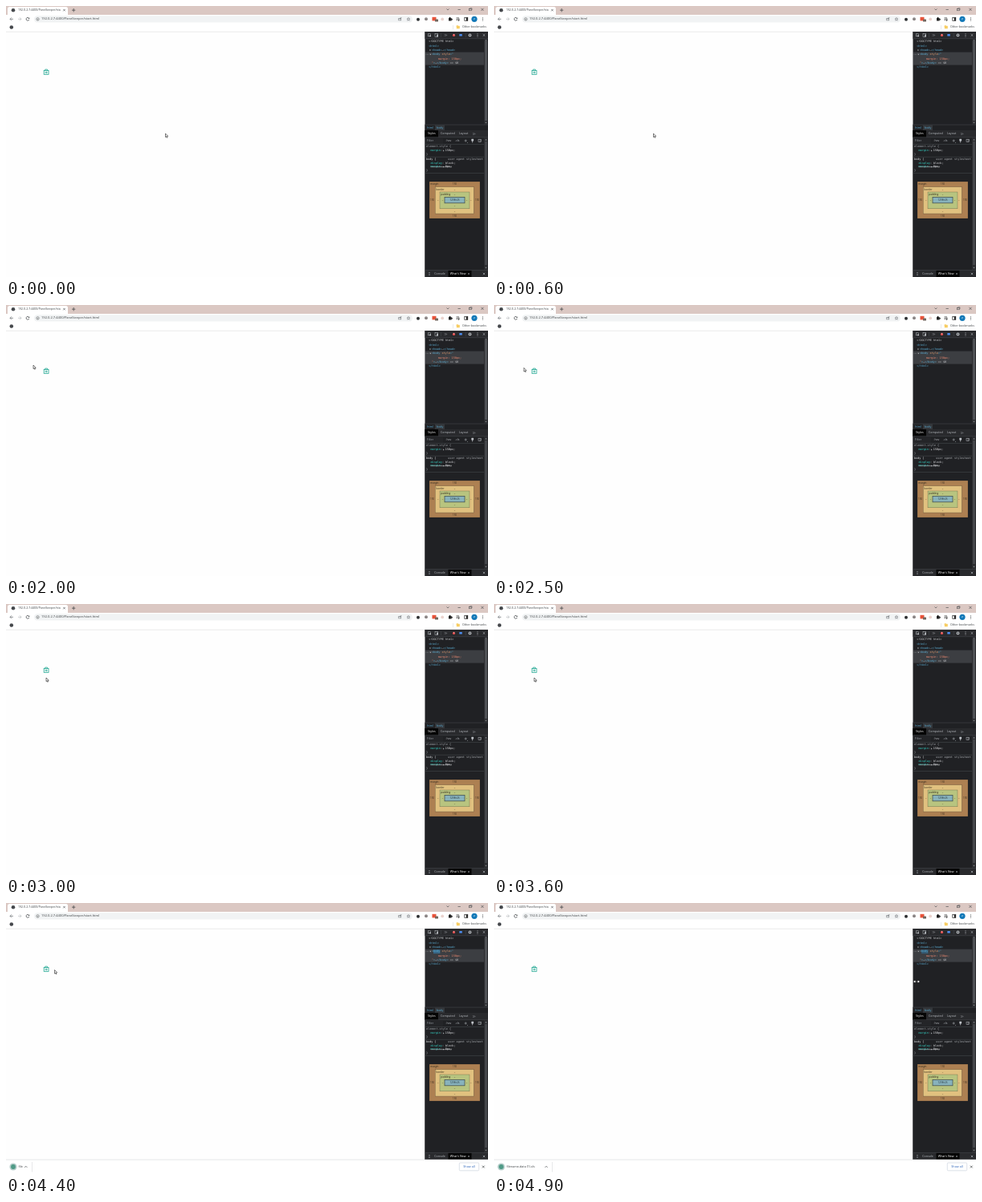
These frames come from a looping animation (600x338 px, 5 s). An HTML page with a canvas:

```html
<!DOCTYPE html>
<html lang="en">
<head>
<meta charset="utf-8">
<title>Browser session</title>
<style>
html, body { margin: 0; width: 100%; height: 100%; overflow: hidden; background: #fff; }
canvas { display: block; width: 100vw; height: 100vh; }
</style>
</head>
<body>
<canvas id="stage"></canvas>
<script>
const W = 600, H = 338, LOOP = 5000, STEP = 100;
const canvas = document.getElementById('stage');
const c = canvas.getContext('2d');
const SANS = '"Open Sans", "Noto Sans", sans-serif';
const MONO = '"DejaVu Sans Mono", "Noto Sans Mono", monospace';
const ADDRESS = '192.0.2.7:4400/Panelkeeper/start.html';
const INK = '#3c4043', PANEL = '#202124', BAR = '#292a2d', RULE = '#494c50';
const TAG = '#5db0d7', PROP = '#35d4c7', VALUE = '#e8eaed', PALE = '#bdc1c6';

// Cursor path: time, x, y of the tip
const PATH = [[0, 198.5, 159], [1300, 198.5, 159], [2000, 34, 75], [2300, 34, 75],
  [3000, 50, 92], [3600, 50, 92], [3900, 50.5, 82.5], [4200, 50.5, 82.5],
  [4400, 60.5, 83.5], [4500, 62, 84], [4900, 526, 98]];
const BAR_AT = 4300, FLASH_AT = 4100;

const clamp = v => Math.max(0, Math.min(1, v));
const mix = (a, b, k) => a + (b - a) * k;
const ease = k => k * k * (3 - 2 * k);

function rect(x, y, w, h, color) {
  c.fillStyle = color;
  c.fillRect(x, y, w, h);
}

function round(x, y, w, h, r, color, stroke) {
  c.beginPath();
  c.roundRect(x, y, w, h, r);
  if (color) { c.fillStyle = color; c.fill(); }
  if (stroke) { c.strokeStyle = stroke; c.lineWidth = 0.5; c.stroke(); }
}

function dot(x, y, r, color) {
  c.beginPath();
  c.arc(x, y, r, 0, Math.PI * 2);
  c.fillStyle = color;
  c.fill();
}

function line(points, color, width = 0.6) {
  c.beginPath();
  for (let i = 0; i < points.length; i += 2) c.lineTo(points[i], points[i + 1]);
  c.strokeStyle = color;
  c.lineWidth = width;
  c.stroke();
}

function shape(points, x, y, fill, stroke, width = 0.6) {
  c.beginPath();
  for (let i = 0; i < points.length; i += 2) c.lineTo(x + points[i], y + points[i + 1]);
  c.closePath();
  c.fillStyle = fill;
  c.fill();
  if (stroke) { c.strokeStyle = stroke; c.lineWidth = width; c.stroke(); }
}

function text(s, x, y, color, size = 3.7, font = SANS, align = 'left') {
  c.font = `${size}px ${font}`;
  c.textAlign = align;
  c.textBaseline = 'middle';
  c.fillStyle = color;
  c.fillText(s, x, y);
}

// Runs of coloured code: text, color, text, color...
function code(x, y, ...runs) {
  for (let i = 0; i < runs.length; i += 2) {
    text(runs[i], x, y, runs[i + 1], 3.44, MONO);
    x += c.measureText(runs[i]).width;
  }
}

function cross(x, y, r, color, width) {
  line([x - r, y - r, x + r, y + r], color, width);
  line([x - r, y + r, x + r, y - r], color, width);
}

function dots(x, y, color) {
  for (const d of [-1.6, 0, 1.6]) dot(x, y + d, 0.5, color);
}

function arrow(x, y, dir, color) {
  line([x - 2 * dir, y, x + 2 * dir, y], color, 0.65);
  line([x, y - 2, x + 2 * dir, y, x, y + 2], color, 0.65);
}

function chevrons(x, y, color) {
  for (const d of [-0.9, 0.7]) line([x + d - 0.6, y - 1.1, x + d + 0.5, y, x + d - 0.6, y + 1.1], color, 0.5);
}

function clipped(x, y, w, h, draw) {
  c.save();
  c.beginPath();
  c.rect(x, y, w, h);
  c.clip();
  draw();
  c.restore();
}

function drawTabs() {
  rect(0, 0, W, 11, '#dbc8c3');
  round(2, 1, 75, 12, [2.5, 2.5, 0, 0], '#fff');
  dot(9, 5.2, 2.3, '#45484c');
  clipped(14, 0, 54, 11, () => text(ADDRESS.slice(0, 32), 15, 5.2, INK, 3.6));
  cross(72.5, 5.2, 1.2, INK, 0.6);
  line([82, 5.2, 86.4, 5.2], INK, 0.7);
  line([84.2, 3, 84.2, 7.4], INK, 0.7);
  line([548.5, 3.6, 550, 5, 551.5, 3.6], INK, 0.6);
  line([562.5, 4.5, 565.8, 4.5], INK, 0.6);
  c.strokeStyle = INK;
  c.lineWidth = 0.5;
  c.strokeRect(576.7, 3.4, 2.4, 2.4);
  line([577.5, 3.3, 577.5, 2.7, 580, 2.7, 580, 5.1, 579.2, 5.1], INK, 0.45);
  cross(593, 4.4, 1.6, INK, 0.6);
}

function drawToolbar() {
  rect(0, 11, W, 21, '#fff');
  arrow(7, 16.3, -1, '#5f6368');
  arrow(17, 16.3, 1, '#b4b7ba');
  c.beginPath();
  c.arc(27, 16.3, 1.9, 0.3, 5.5);
  c.strokeStyle = '#3c4043';
  c.lineWidth = 0.7;
  c.stroke();
  shape([0, 0, 1.8, 0, 1.8, -1.8], 27.4, 16, '#3c4043');

  round(35, 12.3, 471, 8.3, 4.15, '#f1f3f4');
  c.beginPath();
  c.arc(39.5, 16.4, 1.7, 0, 7);
  c.lineWidth = 0.5;
  c.stroke();
  line([39.5, 16, 39.5, 17.3], INK, 0.5);
  text(ADDRESS, 44, 16.4, INK, 4.05);
  c.strokeStyle = '#5f6368';
  c.lineWidth = 0.5;
  c.strokeRect(488.8, 15.3, 3, 2.6);
  line([490, 16.7, 490.5, 15, 492.5, 14.5], '#5f6368', 0.5);
  c.beginPath();
  for (let i = 0; i < 10; i++) {
    const a = i * Math.PI / 5 - Math.PI / 2, r = i % 2 ? 0.9 : 2.1;
    c.lineTo(501 + r * Math.cos(a), 16.5 + r * Math.sin(a));
  }
  c.closePath();
  c.stroke();

  dot(513, 16.7, 2, '#2d2f31');
  dot(523, 16.3, 2, '#8b8585');
  rect(530.5, 13.8, 5, 4.6, '#e8533a');
  round(534, 16.6, 4, 3, 0.6, '#71675f');
  dot(543.2, 16.4, 1.9, '#ead3ce');
  rect(551, 15, 3.6, 3.5, '#222');
  dot(552.6, 14.7, 0.9, '#222');
  dot(555, 16.7, 0.9, '#222');
  for (const d of [0, 1.4, 2.8]) line([560.5, 14.8 + d, d > 2 ? 562.3 : 564, 14.8 + d], '#222', 0.6);
  line([564, 15.5, 564, 18], '#222', 0.6);
  dot(563.5, 18, 0.8, '#222');
  c.strokeStyle = '#222';
  c.lineWidth = 0.7;
  c.strokeRect(570.8, 14.4, 4, 3.9);
  rect(572.8, 14.4, 2, 3.9, '#222');
  dot(583, 16.3, 3.6, '#1479b8');
  text('z', 583, 16.1, '#fff', 4, SANS, 'center');
  dots(593.5, 16.3, '#3c4043');

  dot(6.8, 26.5, 2.3, '#45484c');
  line([556.5, 24, 556.5, 29], '#d5d7da', 0.5);
  round(560.8, 24.8, 4, 3.5, 0.4, '#f7cd63');
  rect(560.8, 24.2, 1.8, 1, '#f7cd63');
  text('Other bookmarks', 568, 26.4, INK, 3.65);
  rect(0, 31.8, W, 0.6, '#dcdcdc');
}

function drawWidget(hover) {
  const green = hover ? '#169c88' : '#22a893';
  c.strokeStyle = green;
  c.lineWidth = 0.8;
  c.strokeRect(47.2, 80.4, 5.8, 4.9);
  line([48.7, 80.4, 48.7, 79.1, 51.5, 79.1, 51.5, 80.4], green, 0.8);
  line([48.5, 82.9, 51.7, 82.9], green, 0.8);
  line([50.1, 81.5, 50.1, 84.4], green, 0.8);
}

function drawElements(t, bottom) {
  rect(521.5, 32, 78.5, 306, PANEL);
  rect(521.5, 32, 78.5, 8.8, BAR);
  rect(521.5, 40.6, 78.5, 0.5, RULE);
  c.strokeStyle = PALE;
  c.lineWidth = 0.5;
  c.strokeRect(525.3, 34.8, 3.2, 3);
  shape([0, 0, 2.2, 0.8, 0.8, 2.2], 527, 36.4, '#e8eaed');
  c.strokeRect(534, 34.3, 3.4, 4);
  rect(536.2, 35.7, 1.7, 2.8, PALE);
  rect(541.4, 34, 0.5, 5, RULE);
  chevrons(547.5, 36.4, PALE);
  dot(557.5, 36.4, 1.6, '#e34b4b');
  text('×', 557.5, 36.1, '#fff', 3, SANS, 'center');
  round(564.3, 34.9, 3.5, 2.7, 0.4, '#4c8df0');
  rect(571.9, 34, 0.5, 5, RULE);
  dot(577.5, 36.4, 1.9, PALE);
  dot(577.5, 36.4, 0.8, BAR);
  dots(587, 36.4, PALE);
  cross(595, 36.4, 1.3, PALE, 0.6);

  rect(522, 57.6, 73, 16, '#3c3e42');
  if (t >= FLASH_AT) {
    const k = clamp((t - FLASH_AT) / 400);
    const fade = [[61, 53], [140, 91], [188, 116]].map(([a, b]) => Math.round(mix(a, b, k)));
    rect(532, 58.1, 8.4, 5, `rgb(${fade})`);
  }
  code(526.3, 44.3, '<!DOCTYPE html>', '#d2d4d7');
  code(526.3, 49.7, '<html>', TAG);
  shape([0, -1, 1.5, 0, 0, 1], 527.5, 55, PALE);
  code(530, 55.1, '<head>', TAG, '…', PALE, '</head>', TAG);
  for (const d of [0, 1.2, 2.4]) dot(523 + d, 60.5, 0.32, PALE);
  shape([-1, 0, 1, 0, 0, 1.5], 528.3, 59.8, PALE);
  code(530, 60.5, '<body', TAG, ' style', '#e69a6d', '="', TAG);
  code(538, 65.7, 'margin: 150px;', '#f28b72');
  code(530, 70.9, '"', '#f28b72', '>', TAG, '…', PALE, '</body>', TAG, ' == $0', '#c6c8cb');
  code(526.3, 76.1, '</html>', TAG);
  rect(595, 41, 5, bottom - 41, '#2b2c2f');
  rect(596, 44, 3, bottom - 49, '#505256');
  shape([0, -1, 1.2, 0.7, -1.2, 0.7], 597.5, 42.7, '#86898d');
  shape([0, 1, 1.2, -0.7, -1.2, -0.7], 597.5, bottom - 2.5, '#86898d');
}

function drawBoxModel() {
  const boxes = [
    [527, 219, 63, 46, '#ad8052', 'margin'],
    [534.3, 225.7, 48, 33.3, '#e1c17f', 'border'],
    [540, 232, 37, 20.8, '#b8c47f', 'padding']];
  for (const [x, y, w, h, color, label] of boxes) {
    rect(x, y, w, h, color);
    c.strokeStyle = 'rgba(30,30,30,.55)';
    c.lineWidth = 0.4;
    c.strokeRect(x, y, w, h);
    text(label, x + 1.3, y + 3.3, '#33291c', 3.1);
    const mark = label === 'margin' ? '150' : '–';
    const at = (mx, my) => text(mark, mx, my, '#3d3020', 3, SANS, 'center');
    at(558.5, y + 3.3);
    at(558.5, y + h - 3.1);
    at(x + 3.5, 242.2);
    at(x + w - 3.5, 242.2);
  }
  rect(546, 238.4, 25, 7.4, '#87b2bc');
  c.lineWidth = 0.7;
  c.strokeStyle = '#3d4848';
  c.strokeRect(546, 238.4, 25, 7.4);
  text('1298×26', 558.5, 242.1, '#26323a', 3, SANS, 'center');
}

function drawStyles() {
  rect(521.5, 147.8, 78.5, 182, PANEL);
  rect(521.5, 147.8, 78.5, 0.5, RULE);
  text('html', 524.3, 151.7, TAG, 3.5);
  rect(534, 148.3, 12, 6.7, '#34373b');
  text('body', 536, 151.7, TAG, 3.5);

  rect(521.5, 155, 78.5, 8.7, BAR);
  rect(521.5, 155, 16.5, 8.7, '#050505');
  text('Styles', 525, 159.3, '#fff', 3.6);
  text('Computed', 541, 159.3, PALE, 3.6);
  text('Layout', 564, 159.3, PALE, 3.6);
  chevrons(582.7, 159.5, PALE);
  rect(521.5, 163.6, 78.5, 0.5, RULE);

  rect(522, 164.5, 22, 7.2, '#242528');
  text('Filter', 524, 168, '#9aa0a6', 3.5);
  text(':hov', 547.5, 168, PALE, 3.5);
  text('.cls', 559.3, 168, PALE, 3.5);
  line([570.6, 168, 573.8, 168], PALE, 0.5);
  line([572.2, 166.4, 572.2, 169.6], PALE, 0.5);
  shape([0, 0, 1, 0, 1, -1], 574, 171, PALE);
  round(579.3, 165.7, 2.8, 2.8, 0.4, PALE);
  rect(580.3, 168, 0.8, 2.4, PALE);
  c.strokeStyle = PALE;
  c.lineWidth = 0.5;
  c.strokeRect(588, 166.2, 3.6, 3.4);
  line([590.2, 166.2, 590.2, 169.6], PALE, 0.5);
  rect(521.5, 172, 74, 0.5, RULE);

  code(523, 175.3, 'element.style', '#a4a8ad', ' {', PALE);
  code(528.5, 180.5, 'margin', PROP, ':', PALE);
  shape([0, -0.9, 1.3, 0, 0, 0.9], 544.2, 180.5, PALE);
  code(546.7, 180.5, '150px;', VALUE);
  code(523, 185, '}', PALE);
  rect(521.5, 187.9, 74, 0.5, RULE);
  code(523, 191.1, 'body {', VALUE);
  text('user agent stylesheet', 593.7, 191.1, '#aeb1b5', 3.44, MONO, 'right');
  code(528.5, 196, 'display', PROP, ':', PALE);
  code(547, 196, 'block;', VALUE);
  code(528.5, 200.6, 'margin', PROP, ':', PALE);
  shape([0, -0.9, 1.3, 0, 0, 0.9], 544.2, 200.6, PALE);
  code(546.7, 200.6, '8px;', VALUE);
  line([528.5, 200.7, 555, 200.7], '#d0d3d6', 0.5);
  code(523, 205, '}', PALE);
  rect(521.5, 208.3, 74, 0.5, RULE);

  drawBoxModel();

  rect(595, 164, 5, 165.5, '#2b2c2f');
  rect(596, 169, 3, 154, '#45474b');
  shape([0, -1, 1.2, 0.7, -1.2, 0.7], 597.5, 166.8, '#86898d');
  shape([0, 1, 1.2, -0.7, -1.2, -0.7], 597.5, 326.5, '#86898d');

  rect(521.5, 329.6, 78.5, 8.5, BAR);
  rect(521.5, 329.4, 78.5, 0.5, RULE);
  dots(527, 334, PALE);
  text('Console', 533.3, 333.9, PALE, 3.6);
  rect(550.5, 329.9, 29, 8.2, '#050505');
  text("What's New", 552.8, 333.9, '#fff', 3.6);
  cross(576, 334, 0.9, PALE, 0.5);
  cross(595, 334, 1.2, PALE, 0.6);
}

function drawDownloads(t) {
  const edge = mix(32, 72.3, ease(clamp((t - 4400) / 400)));
  rect(0, 320, W, 18, '#fff');
  rect(0, 319.8, W, 0.6, '#d5d7da');
  dot(9, 329, 4.6, '#b9cfcc');
  dot(9, 329, 2.9, '#4f9a86');
  clipped(15, 321, Math.max(0, edge - 26), 17, () =>
    text('filename-data (1).xls', 15.5, 329, INK, 3.75));
  line([edge - 8.7, 329.8, edge - 7.2, 328.3, edge - 5.7, 329.8], INK, 0.7);
  rect(edge, 323, 0.5, 12.5, '#cfd1d4');
  round(564.3, 324, 24.4, 9.8, 1.2, '#fff', '#b9c2d0');
  text('Show all', 576.5, 328.8, '#2b62b8', 3.75, SANS, 'center');
  cross(594.3, 329, 1.4, INK, 0.7);
}

function cursorAt(t) {
  const i = PATH.findIndex(p => p[0] > t);
  if (i < 0) return PATH[PATH.length - 1].slice(1);
  const [t0, x0, y0] = PATH[i - 1], [t1, x1, y1] = PATH[i];
  const k = ease((t - t0) / (t1 - t0));
  return [mix(x0, x1, k), mix(y0, y1, k)];
}

function drawCursor(x, y, hand) {
  if (x > 520) {
    line([x - 2.5, y, x + 2.5, y], '#fff', 0.8);
    shape([0, 0, 2, -1.5, 2, 1.5], x - 3.8, y, '#fff');
    shape([0, 0, -2, -1.5, -2, 1.5], x + 3.8, y, '#fff');
    rect(x - 0.6, y - 1.5, 1.2, 3, '#111');
  } else if (hand) {
    shape([0, 0, 0.9, 0, 1, 2, 3, 2.6, 3, 4.2, 2.3, 5.3, 0.1, 5.3, -1.3, 3.2, -0.8, 2.7, 0, 3.3],
      x, y, '#fff', '#222', 0.5);
  } else {
    shape([0, 0, 0, 4.6, 1, 3.7, 1.7, 5.3, 2.5, 4.9, 1.8, 3.4, 3.2, 3.3], x, y, '#fff', '#222');
  }
}

function draw(t) {
  const open = t >= BAR_AT;
  const shift = open ? -18 : 0;
  const [x, y] = cursorAt(t);
  const hand = t >= 3800 && t <= 4200;
  rect(0, 0, W, H, '#fefefe');
  drawTabs();
  drawToolbar();
  drawWidget(hand);
  drawElements(t, 148 + shift);
  c.save();
  c.translate(0, shift);
  drawStyles();
  c.restore();
  if (open) drawDownloads(t);
  drawCursor(x, y, hand);
}

function resize() {
  const ratio = window.devicePixelRatio || 1;
  canvas.width = Math.round(innerWidth * ratio);
  canvas.height = Math.round(innerHeight * ratio);
}

function tick() {
  c.setTransform(canvas.width / W, 0, 0, canvas.height / H, 0, 0);
  draw(Math.floor(performance.now() % LOOP / STEP) * STEP);
  requestAnimationFrame(tick);
}

addEventListener('resize', resize);
resize();
tick();
</script>
</body>
</html>
```
